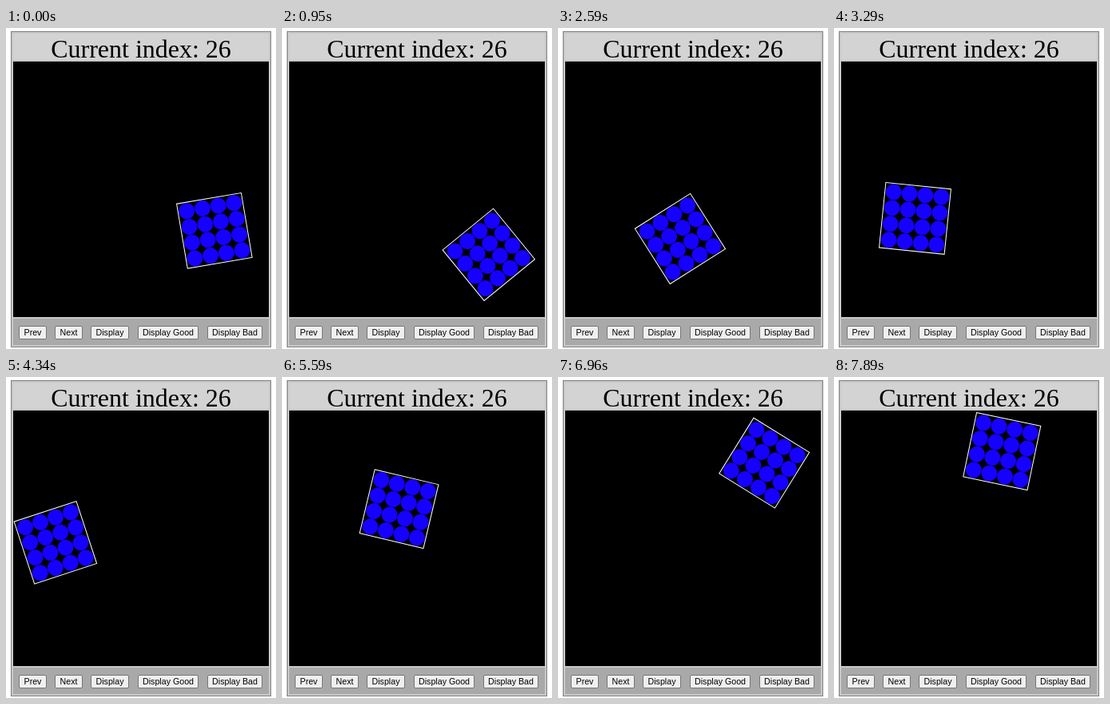
Animation, 338 px wide and 402 px high, one loop 7.99 s. Source, as an HTML page:

```html
<!DOCTYPE html>
<html lang="en">
<head>
<meta charset="utf-8">
<title>Current index</title>
<style>
  html, body { margin: 0; width: 100%; height: 100%; overflow: hidden; background: #fff; }
  svg { display: block; width: 100vw; height: 100vh; }
  .title { font: 32px "Liberation Serif", serif; }
  .label { font: 10.67px "Liberation Sans", sans-serif; }
  text { text-anchor: middle; fill: #000; }
</style>
</head>
<body>
<svg viewBox="0 0 338 402">
  <rect x="6.5" y="4.5" width="325" height="395" fill="#c8c8c8" stroke="#808080"/>
  <rect x="9" y="7" width="320" height="33" fill="#d3d3d3"/>
  <rect x="9" y="42" width="320" height="320" fill="#000"/>
  <rect x="9" y="364" width="320" height="33" fill="#a9a9a9"/>
  <text class="title" x="169" y="36.5">Current index: 26</text>
  <g id="buttons"></g>
  <g id="body">
    <rect x="-41" y="-41" width="82" height="82" fill="none" stroke="#fff"/>
  </g>
</svg>
<script>
const LOOP = 7990, LAST_FRAME = 7890, SPIN = 4.273, START_ANGLE = -9.8;

// Uneven simulation pace: step reached at a given time in ms
const PACE = [[0, 0], [1890, 70], [3290, 130], [4340, 166.5], [5590, 216], [6960, 283.5], [LAST_FRAME, 321]];

// Constant speed per axis; each bounce is [step, half its contact time]
const X = { start: 267.9, speed: 1.715, bounces: [[16.5, 33], [159.9, 8], [287.1, 10.7]] };
const Y = { start: 253.8, speed: 0.852, bounces: [[56, 8], [310.8, 5]] };

function stepAt(t) {
  const i = Math.max(1, PACE.findIndex(([time]) => time >= t));
  const [t0, s0] = PACE[i - 1], [t1, s1] = PACE[i];
  return s0 + (s1 - s0) * (t - t0) / (t1 - t0);
}

// Zero before the contact, u after it, parabolic in between
function ramp(u, half) {
  if (u <= -half) return 0;
  return u >= half ? u : (u + half) ** 2 / (4 * half);
}

function position({ start, speed, bounces }, step) {
  let path = step, turn = -2;
  for (const [at, half] of bounces) {
    path += turn * ramp(step - at, half);
    turn = -turn;
  }
  return start + speed * path;
}

function add(parent, tag, attrs, text = "") {
  const el = document.createElementNS("http://www.w3.org/2000/svg", tag);
  for (const key in attrs) el.setAttribute(key, attrs[key]);
  el.textContent = text;
  parent.append(el);
}

const buttons = document.getElementById("buttons");
const body = document.getElementById("body");

[["Prev", 16, 35], ["Next", 61, 35], ["Display", 106, 48], ["Display Good", 165, 76], ["Display Bad", 252, 69]]
  .forEach(([name, x, width]) => {
    add(buttons, "rect", { x: x + 0.5, y: 373.5, width: width - 1, height: 16, rx: 1.5, fill: "#efefef", stroke: "#767676" });
    add(buttons, "text", { class: "label", x: x + width / 2, y: 385 }, name);
  });

for (let i = 0; i < 16; i++) {
  add(body, "circle", { cx: (i % 4) * 20 - 30, cy: (i >> 2) * 20 - 30, r: 10, fill: "#1600ff" });
}

function draw(t) {
  const step = stepAt(Math.min(t, LAST_FRAME));
  const x = position(X, step), y = position(Y, step);
  body.setAttribute("transform", `translate(${x} ${y}) rotate(${START_ANGLE + SPIN * step})`);
}

const begin = performance.now();
function tick() {
  draw((performance.now() - begin) % LOOP);
  requestAnimationFrame(tick);
}
tick();
</script>
</body>
</html>
```
